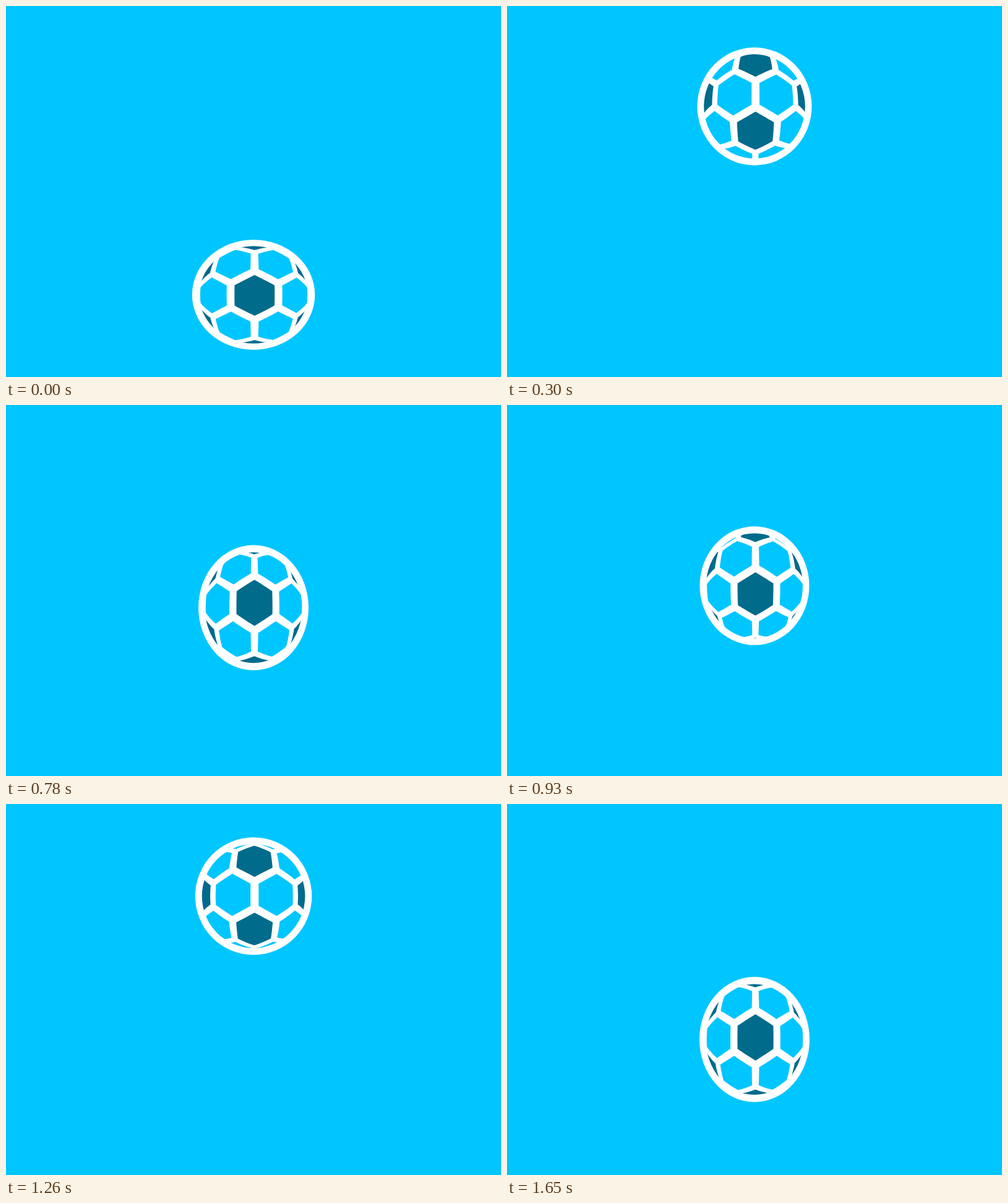
Animation, 800 px wide and 600 px high, one loop 1.68 s. Source, as an HTML page:

```html
<!DOCTYPE html>
<html lang="en">
<head>
<meta charset="utf-8">
<title>Bouncing ball</title>
<style>
  html, body { margin: 0; width: 100%; height: 100%; overflow: hidden; background: #00c6ff; }
  svg { display: block; width: 100%; height: 100%; }
</style>
</head>
<body>
<svg viewBox="0 0 800 600">
  <defs><clipPath id="inner"><circle r="84"/></clipPath></defs>
  <rect width="800" height="600" fill="#00c6ff"/>
  <g id="ball">
    <circle r="95" fill="#fff"/>
    <g clip-path="url(#inner)">
      <path id="light" fill="#00c6ff"/>
      <path id="dark" fill="#006b8b"/>
    </g>
  </g>
</svg>
<script>
const LOOP = 1680, BOUNCE = 840, STEP = 30;
const APEX = 244, FLOOR = 556;

// Panel sizes are angles on the sphere.
const SPHERE = 88, PERIOD = 1.49, WIDEN = 1.015;
const CELL = PERIOD / 3, PITCH = CELL * Math.sqrt(3) * WIDEN;
const PANEL = 0.411;
const SHIFT = 0.02;

const SQUASH = [198.5, 178], RISE = [177, 192], ROUND = [188.5, 190], FALL = [178, 202.5];

const el = id => document.getElementById(id);
const ball = el('ball'), light = el('light'), dark = el('dark');
const clamp = v => Math.max(0, Math.min(1, v));
const smooth = v => { v = clamp(v); return v * v * (3 - 2 * v); };
const mix = (a, b, k) => a.map((v, i) => v + (b[i] - v) * k);
const mod = (a, n) => ((a % n) + n) % n;

// Cubic Bezier easing through (0,0) and (1,1).
function bezier(x1, y1, x2, y2) {
  const at = (s, a, b) => 3 * a * s * (1 - s) ** 2 + 3 * b * s * s * (1 - s) + s ** 3;
  return x => {
    let lo = 0, hi = 1;
    for (let i = 0; i < 30; i++) {
      const mid = (lo + hi) / 2;
      if (at(mid, x1, x2) < x) lo = mid; else hi = mid;
    }
    return at((lo + hi) / 2, y1, y2);
  };
}
const drop = bezier(0.55, 0, 0.86, 0.43);

function sizeAt(t) {
  if (t < 90) return mix(SQUASH, RISE, t / 90);
  if (t < 420) return mix(RISE, ROUND, smooth((t - 90) / 330));
  return mix(ROUND, FALL, smooth((t - 470) / 310));
}

// The roll is slightly slower while rising than while falling.
const rollAt = phase => phase * PERIOD + 0.022 * Math.cos(2 * Math.PI * phase + 0.46) - 0.006;

// Wrap a flat texture point onto the visible half of the sphere.
function project(x, y) {
  const a = Math.hypot(x, y) || 1e-6;
  const k = SPHERE * Math.sin(Math.min(a, Math.PI / 2)) / a;
  return (x * k).toFixed(2) + ' ' + (y * k).toFixed(2);
}

function hexagon(cx, cy) {
  const pts = [], cuts = 6;
  const corner = i => {
    const a = Math.PI / 3 * i + Math.PI / 6;
    return [cx + PANEL * WIDEN * Math.cos(a), cy + PANEL * Math.sin(a)];
  };
  for (let i = 0; i < 6; i++) {
    for (let j = 0; j < cuts; j++) {
      pts.push(project(...mix(corner(i), corner(i + 1), j / cuts)));
    }
  }
  return 'M' + pts.join('L') + 'Z';
}

function drawPanels(roll) {
  let lightPath = '', darkPath = '';
  for (let row = -6; row <= 4; row++) {
    const odd = mod(row, 2);
    const y = row * PERIOD / 2 + roll;
    for (let col = -3; col <= 3; col++) {
      const x = (col + odd / 2) * PITCH + SHIFT;
      if (Math.hypot(x, y) > 2) continue;
      if (mod(col - odd, 3) === 0) darkPath += hexagon(x, y);
      else lightPath += hexagon(x, y);
    }
  }
  light.setAttribute('d', lightPath);
  dark.setAttribute('d', darkPath);
}

function render(time) {
  const t = Math.floor((time % LOOP) / STEP) * STEP % BOUNCE;
  const bottom = APEX + (FLOOR - APEX) * drop(Math.abs(t / (BOUNCE / 2) - 1));
  const [w, h] = sizeAt(t);
  ball.setAttribute('transform',
    `translate(400 ${bottom - h / 2}) scale(${w / 190} ${h / 190})`);
  drawPanels(rollAt(t / BOUNCE));
}

function tick() {
  render(performance.now());
  requestAnimationFrame(tick);
}
tick();
</script>
</body>
</html>
```
